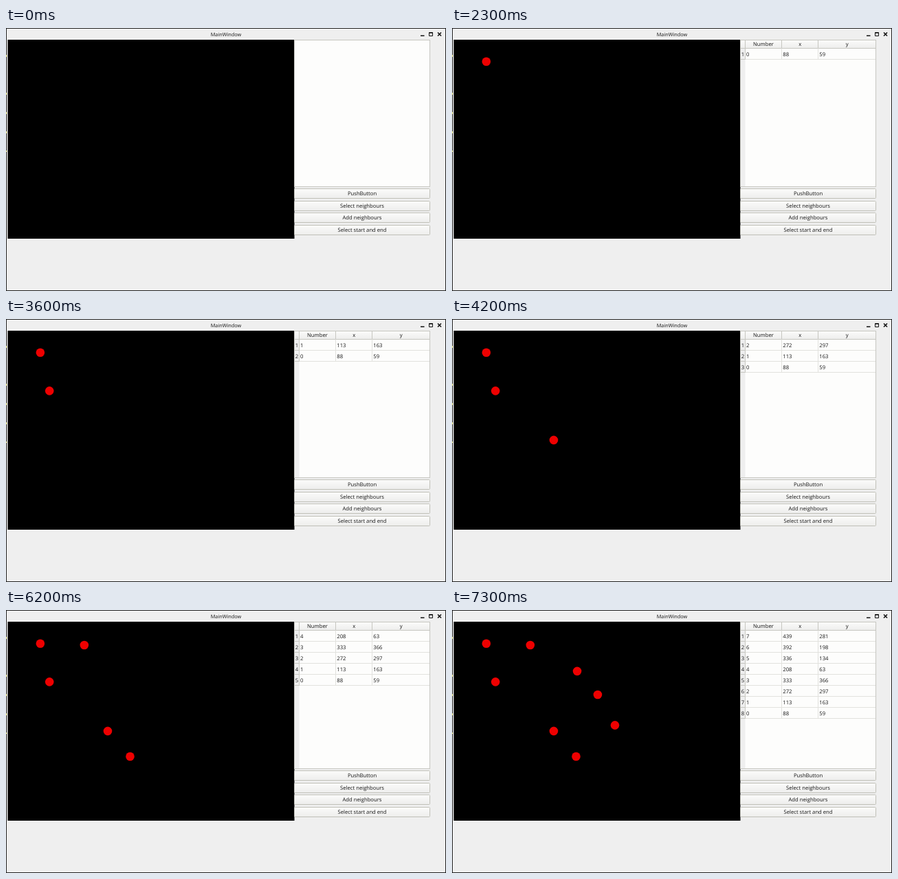
An HTML page for the animation above (8000 ms loop, 640 px wide and 382 px high).

```html
<!DOCTYPE html>
<html lang="en">
<head>
<meta charset="utf-8">
<style>
  html, body { margin: 0; width: 100%; height: 100%; overflow: hidden; background: #efefef; }
  svg { display: block; width: 640px; height: 382px; }
  text { font-family: "Open Sans", "Noto Sans", sans-serif; font-size: 7.7px; fill: #161616; text-rendering: geometricPrecision; }
  .mid { text-anchor: middle; }
  .title { font-size: 7.3px; }
  .line { stroke: #e2e2de; stroke-width: 1; fill: none; }
  .edge { stroke: #c6c6c0; stroke-width: 1; fill: none; }
  .icon { stroke: #111; fill: none; }
</style>
</head>
<body>
<svg viewBox="0 0 640 382">
  <defs>
    <linearGradient id="face" x1="0" y1="0" x2="0" y2="1">
      <stop offset="0" stop-color="#fbfbfa"/>
      <stop offset="1" stop-color="#ededec"/>
    </linearGradient>
  </defs>
  <rect width="640" height="382" fill="#efefef"/>
  <rect x=".5" y=".5" width="639" height="381" fill="none" stroke="#222"/>
  <path stroke="#c8c860" d="M.5 39v3M.5 94v3M.5 122v3M.5 150v3M.5 178v2"/>
  <text class="mid title" x="320" y="11.6">MainWindow</text>
  <path class="icon" stroke-width="1.6" d="M603 11.2h5.5M628 6.5l5 5m0-5l-5 5"/>
  <path class="icon" d="M615.5 6.5h5v5h-5zM615 7.2h6"/>
  <rect x="2.5" y="17" width="417" height="289"/>
  <g id="dots" fill="#ee0000"></g>
  <rect class="edge" x="419.5" y="17.5" width="197" height="213" style="fill:#fdfdfc"/>
  <g id="table"></g>
  <g id="buttons"></g>
</svg>
<script>
const NS = "http://www.w3.org/2000/svg";
const LOOP = 8000;
// appearance time, x, y
const points = [
  [2300, 88, 59], [3300, 113, 163], [4100, 272, 297], [5300, 333, 366],
  [6200, 208, 63], [6600, 336, 134], [7000, 392, 198], [7300, 439, 281]
];
const [dots, table, buttons] = ["dots", "table", "buttons"].map(id => document.getElementById(id));

function add(parent, tag, attrs, text) {
  const el = document.createElementNS(NS, tag);
  for (const key in attrs) el.setAttribute(key, attrs[key]);
  if (text !== undefined) el.textContent = text;
  parent.append(el);
}

["PushButton", "Select neighbours", "Add neighbours", "Select start and end"].forEach((label, i) => {
  const y = Math.round(233 + i * 17.65) + .5;
  add(buttons, "rect", { x: 419.5, y, width: 197, height: 14, rx: 1, fill: "url(#face)", stroke: "#c0c0b8" });
  add(buttons, "text", { x: 518, y: y + 9.9, class: "mid" }, label);
});

function drawTable(count) {
  add(table, "rect", { x: 420, y: 18, width: 6.5, height: 212, fill: "#efefef" });
  add(table, "rect", { x: 420, y: 18, width: 196, height: 11.5, fill: "url(#face)" });
  [["Number", 453], ["x", 506.3], ["y", 574.7]].forEach(([name, x]) =>
    add(table, "text", { x, y: 26.4, class: "mid" }, name));
  add(table, "path", { class: "edge", d: "M420 29.5H616M426.5 18V29M479.5 18V29M532.5 18V29" });
  for (let row = 0; row < count; row++) {
    const n = count - 1 - row, top = 29.5 + row * 16, base = top + 11.1;
    add(table, "path", { class: "line", d: `M426 ${top + 16}H616M479.5 ${top}v16M532.5 ${top}v16` });
    add(table, "path", { class: "edge", d: `M420 ${top + 16}h6.5v-16` });
    add(table, "text", { x: 422.9, y: base + .4, class: "mid" }, row + 1);
    [n, points[n][1], points[n][2]].forEach((value, i) =>
      add(table, "text", { x: [428, 481.3, 534.3][i], y: base }, value));
  }
}

let shown = -1;
function frame(now) {
  const t = now % LOOP;
  const count = points.filter(p => t >= p[0]).length;
  if (count !== shown) {
    shown = count;
    dots.replaceChildren();
    table.replaceChildren();
    points.slice(0, count).forEach(([, x, y]) =>
      add(dots, "circle", { cx: 3 + x * .533, cy: 17.3 + y * .534, r: 6.3 }));
    if (count) drawTable(count);
  }
  requestAnimationFrame(frame);
}
frame(0);
</script>
</body>
</html>
```
